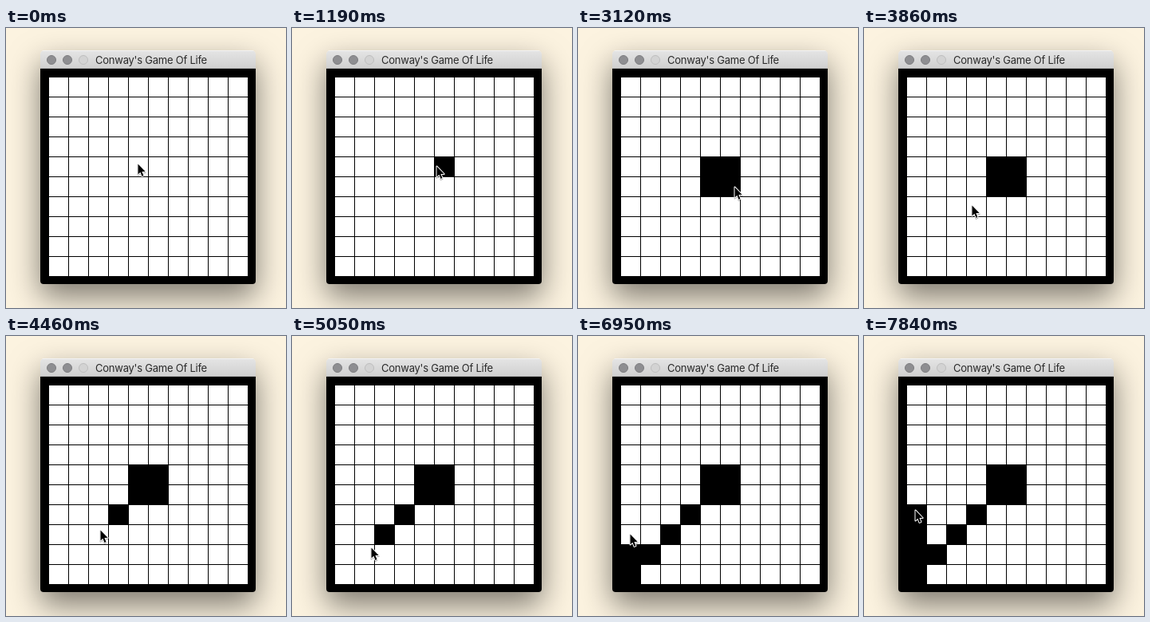
Write an HTML page that moves like this. It is 351x351 px and loops after 8000 ms.

```html
<!DOCTYPE html>
<html lang="en">
<head>
<meta charset="utf-8">
<title>Conway's Game Of Life</title>
<style>
  html, body { margin: 0; width: 100%; height: 100%; overflow: hidden; background: #fcf3e0; }
  .window {
    position: absolute; left: 43px; top: 28px; width: 270px; height: 293px;
    border-radius: 5px 5px 4px 4px;
    background: linear-gradient(#f2f2f2 1px, #e4e4e4 1px, #d0d0d0 22px, #b4b4b4 22px 23px, #000 23px);
    box-shadow: 0 16px 38px rgba(0, 0, 0, .5);
  }
  svg { position: absolute; left: 0; top: 0; }
  text { font: 13px Inter, sans-serif; letter-spacing: -.24px; fill: #2a2a2a; }
  .button { fill: #8e8e91; stroke: #7d7d80; }
  .disabled { fill: #d3d3d3; stroke: #bebebe; }
  #cursor { filter: drop-shadow(0 1px .7px rgba(0, 0, 0, .35)); }
</style>
</head>
<body>
<div class="window"></div>
<svg width="351" height="351" viewBox="0 0 351 351">
  <circle class="button" cx="57" cy="40" r="5.5"/>
  <circle class="button" cx="77" cy="40" r="5.5"/>
  <circle class="disabled" cx="97" cy="40" r="5.5"/>
  <text x="112" y="45">Conway's Game Of Life</text>
  <g id="grid" shape-rendering="crispEdges"></g>
  <path id="cursor" d="M0 0V13L2.9 10.2L5 15.4L7 14.5L4.9 9.6H9.2Z"
        stroke="#fff" stroke-width="2" stroke-linejoin="round" paint-order="stroke"/>
</svg>
<script>
const LOOP = 8000, TICK = 148, CELL = 25, COUNT = 10, LEFT = 54, TOP = 62;

// Start point, then every click: tick, x, y
const [start, ...clicks] = [
  [0, 165, 170], [8, 181, 173], [12, 154, 174], [17, 161, 203],
  [21, 196, 199], [28, 135, 222], [32, 115, 246], [36, 97, 268],
  [40, 68, 302], [44, 65, 266], [48, 65, 248], [53, 64, 218]
];

const grid = document.getElementById('grid');
const cursor = document.getElementById('cursor');

const cells = Array.from({ length: COUNT * COUNT }, (_, i) => {
  const rect = document.createElementNS('http://www.w3.org/2000/svg', 'rect');
  const attributes = {
    x: LEFT + i % COUNT * CELL, y: TOP + Math.floor(i / COUNT) * CELL,
    width: CELL - 1, height: CELL - 1
  };
  for (const name in attributes) rect.setAttribute(name, attributes[name]);
  return grid.appendChild(rect);
});

const cellAt = ([, x, y]) =>
  Math.floor((y - TOP) / CELL) * COUNT + Math.floor((x - LEFT) / CELL);

const easeOut = p => 1 - (1 - p) ** 3;

// The cursor rests one tick after a click and arrives one tick before the next
function position(tick, from, to) {
  const progress = (tick - from[0] - 1) / (to[0] - from[0] - 2);
  const eased = easeOut(Math.min(1, Math.max(0, progress)));
  return [1, 2].map(i => Math.round(from[i] + (to[i] - from[i]) * eased) + .5);
}

function draw() {
  const tick = Math.floor((performance.now() % LOOP + 5) / TICK);
  const done = clicks.filter(click => click[0] <= tick);
  const alive = new Set(done.map(cellAt));
  cells.forEach((rect, i) => rect.setAttribute('fill', alive.has(i) ? '#000' : '#fff'));
  const from = done[done.length - 1] || start;
  const to = clicks[done.length] || from;
  cursor.setAttribute('transform', `translate(${position(tick, from, to)})`);
  requestAnimationFrame(draw);
}
draw();
</script>
</body>
</html>
```
